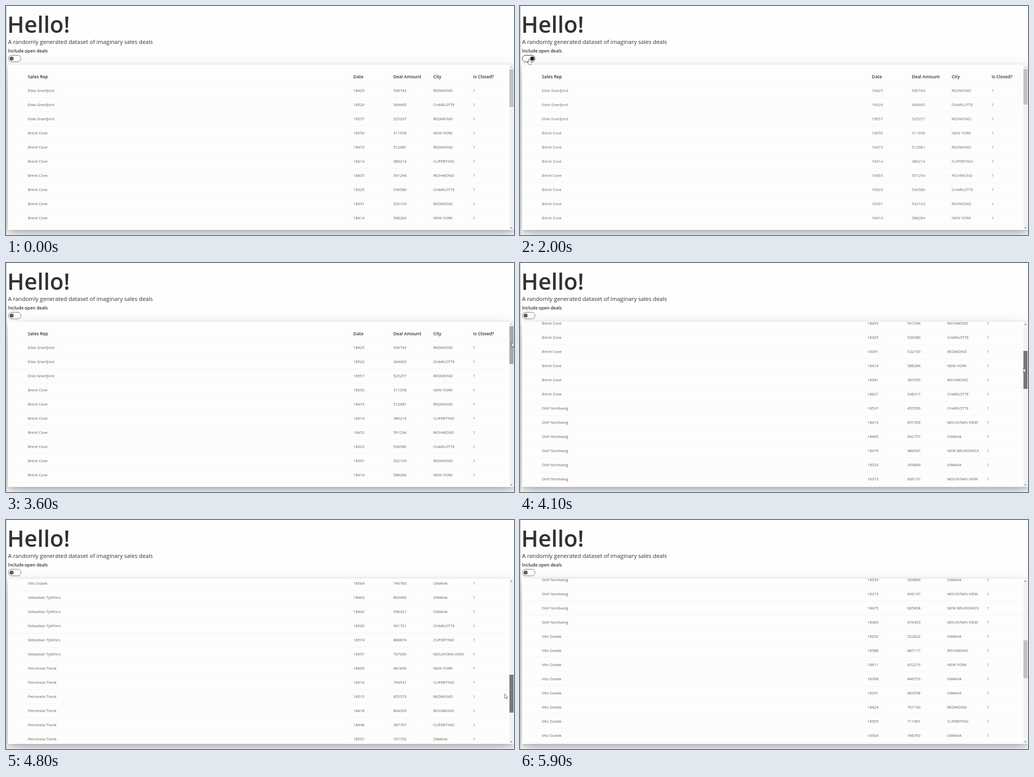
These frames come from a looping animation (1000x453 px, 6600 ms). An HTML page:

```html
<!DOCTYPE html>
<html lang="en">
<head>
<meta charset="utf-8">
<title>Sales deals</title>
<style>
  html, body { margin: 0; width: 100%; height: 100%; overflow: hidden; background: #fefefe; }
  body { position: relative; font-family: "Open Sans", "Noto Sans", sans-serif; color: #323130; }
  body *, svg { position: absolute; box-sizing: border-box; white-space: nowrap; }
  h1, p, label { margin: 0; }
  h1 { left: 2.5px; top: 5.7px; font-size: 44.5px; font-weight: 600; line-height: 60px; }
  p { left: 4px; top: 61.3px; font-size: 11.2px; line-height: 20px; }
  label { left: 4px; top: 80.6px; font-size: 8.65px; font-weight: 600; line-height: 16px; }
  .edge { left: 0; top: 0; width: 1px; height: 100%; background: #b4b4b4; }

  .toggle { left: 4px; top: 97px; width: 26px; height: 13.5px; border: 1px solid #7a7876; border-radius: 7px; background: #fff; }
  .knob { left: 2px; top: 1.75px; width: 8px; height: 8px; border-radius: 50%; background: #605e5c; }
  .toggle.hover { border-color: #323130; }
  .hover .knob { background: #201f1e; }
  .on .knob { left: 14.5px; }

  .card { left: 4px; top: 116px; width: 995.5px; height: 327px; background: #fdfdfd;
    box-shadow: 0 14px 32px rgba(0,0,0,.22), 0 2.7px 8px rgba(0,0,0,.18); }
  .view { inset: 0 8.5px 0 0; overflow: hidden; }
  .list, .rows { left: 0; top: 0; width: 100%; }
  .row { left: 0; width: 100%; height: 28px; border-bottom: 1px solid #f7f6f6; font-size: 7.6px; line-height: 27px; color: #605e5c; }
  .head { font-size: 8.7px; font-weight: 600; line-height: 28px; color: #323130; }
  .row span { left: calc(601.2px + 78.6px * var(--col) + var(--shift)); }
  .row span:first-child { left: 39px; }

  .bar { right: 0; top: 0; width: 8.5px; height: 100%; background: #f3f3f3; }
  .thumb { left: 0; top: 9px; width: 7.5px; }
  .arrow { left: 2px; border: 2px solid transparent; }
  .up { top: 1.5px; border-bottom: 2.6px solid #505050; }
  .down { bottom: 1.5px; border-top: 2.6px solid #505050; }
  .cursor { left: 0; top: 0; overflow: visible; fill: #fff; stroke: #444; stroke-width: .7; stroke-linejoin: round; }
</style>
</head>
<body>
<h1>Hello!</h1>
<p>A randomly generated dataset of imaginary sales deals</p>
<label>Include open deals</label>
<div class="card">
  <div class="view"><div class="list"><div class="rows"></div></div></div>
  <div class="bar"><i class="arrow up"></i><i class="thumb"></i><i class="arrow down"></i></div>
</div>
<div class="toggle"><i class="knob"></i></div>
<div class="edge"></div>
<svg class="cursor" width="12" height="14">
  <path class="pointer" d="M0 0V9L2 7.2 3.4 10.3 4.7 9.7 3.4 6.7 6.1 6.5Z"/>
  <path class="hand" transform="translate(-3.9 0)" d="M3 6.5V1a.9.9 0 0 1 1.8 0V4.2l3.2.6q1 .3 1 1.3v2q0 2-1 3.4H4L1 7.4q-.5-1.2.7-1L3 7.6Z"/>
</svg>
<script>
const $ = s => document.querySelector(s);
const LOOP = 6600, STEP = 100, ROW = 28, HEAD = 38;
const PEAK = 901, REST = 497.5, SCROLL_RATIO = 4.4;

const cities = {
  R: 'REDMOND', C: 'CHARLOTTE', N: 'NEW YORK', U: 'CUPERTINO',
  I: 'RICHMOND', O: 'OMAHA', M: 'MOUNTAIN VIEW', B: 'NEW BRUNSWICK'
};
// One letter per deal, naming its city.
const reps = {
  'Elsie Granfjord': 'RCR',
  'Brent Cove': 'NRUICRNIC',
  'Olof Nordvang': 'CMOBOMBM',
  'Vito Dubek': 'OINOORUO',
  'Sebastian Tjellfors': 'OOCUM',
  'Petronela Tisnik': 'NURIUOCROMNUB'
};

let seed = 7;
function rand(lo, hi) {
  seed = (seed * 16807) % 2147483647;
  return lo + seed % (hi - lo);
}

function addRow(parent, top, cells, kind = '') {
  const row = parent.appendChild(document.createElement('div'));
  row.className = 'row ' + kind;
  row.style.top = top + 'px';
  cells.forEach((text, col) => {
    const cell = row.appendChild(document.createElement('span'));
    cell.textContent = text;
    cell.style.setProperty('--col', col);
  });
}

addRow($('.list'), HEAD - ROW, ['Sales Rep', 'Date', 'Deal Amount', 'City', 'Is Closed?'], 'head');
let top_ = HEAD;
for (const [name, deals] of Object.entries(reps)) {
  for (const city of deals) {
    addRow($('.rows'), top_, [name, rand(18262, 18628), rand(310000, 970000), cities[city], 1]);
    top_ += ROW;
  }
}

const within = (t, from, to) => t >= from && t < to;
const progress = (t, from, to) => Math.min(1, Math.max(0, (t - from) / (to - from)));
const mix = (a, b, p) => a + (b - a) * p;
const easeOut = p => Math.sin(p * Math.PI / 2);

// The list is dragged down, slowing to a peak, then partly back up.
function scrollAt(t) {
  const down = PEAK * easeOut(progress(t, 3900, 5200));
  return mix(down, REST, progress(t, 5200, 5500));
}

// Rows fade in again after each refresh.
function fadeAt(t) {
  const since = t < 2600 ? t - 1700 : t - 2600;
  return since < 0 ? 1 : mix(.72, 1, progress(since, 0, 400));
}

function cursorAt(t, drag) {
  if (t < 2900) {
    const p = progress(t, 300, 900);
    return [mix(24, 17.5, p), mix(436, 104.5, p)];
  }
  const p = easeOut(progress(t, 2800, 3600));
  return [
    mix(17.5, 995.5, p) - 14 * Math.min(1, drag / 140),
    mix(104.5, 157, p) + drag * 1.03
  ];
}

function draw(t) {
  const scroll = scrollAt(t), drag = scroll / SCROLL_RATIO;
  const open = within(t, 1800, 2700);
  const overToggle = within(t, 900, 2900);

  $('.list').style.transform = `translateY(${-scroll}px)`;
  $('.list').style.setProperty('--shift', open ? '8.8px' : '0px');
  $('.rows').style.opacity = fadeAt(t);

  const thumb = $('.thumb').style;
  thumb.height = open ? '70px' : '75px';
  thumb.transform = `translateY(${Math.round(drag)}px)`;
  thumb.background = within(t, 3900, 5800) ? '#787878' : within(t, 3600, 3900) ? '#a8a8a8' : '#c1c1c1';
  $('.up').style.borderBottomColor = scroll > 0 ? '#505050' : '#a3a3a3';

  $('.toggle').classList.toggle('hover', overToggle);
  $('.toggle').classList.toggle('on', within(t, 1300, 2200));

  const [x, y] = cursorAt(t, drag);
  const cursor = $('.cursor').style;
  cursor.transform = `translate(${x}px, ${y}px)`;
  cursor.display = within(t, 300, 5900) ? 'block' : 'none';
  $('.hand').style.display = overToggle ? 'inline' : 'none';
  $('.pointer').style.display = overToggle ? 'none' : 'inline';
}

const start = performance.now();
function tick() {
  const t = (performance.now() - start) % LOOP;
  draw(Math.floor(t / STEP) * STEP);
  requestAnimationFrame(tick);
}
tick();
</script>
</body>
</html>
```
